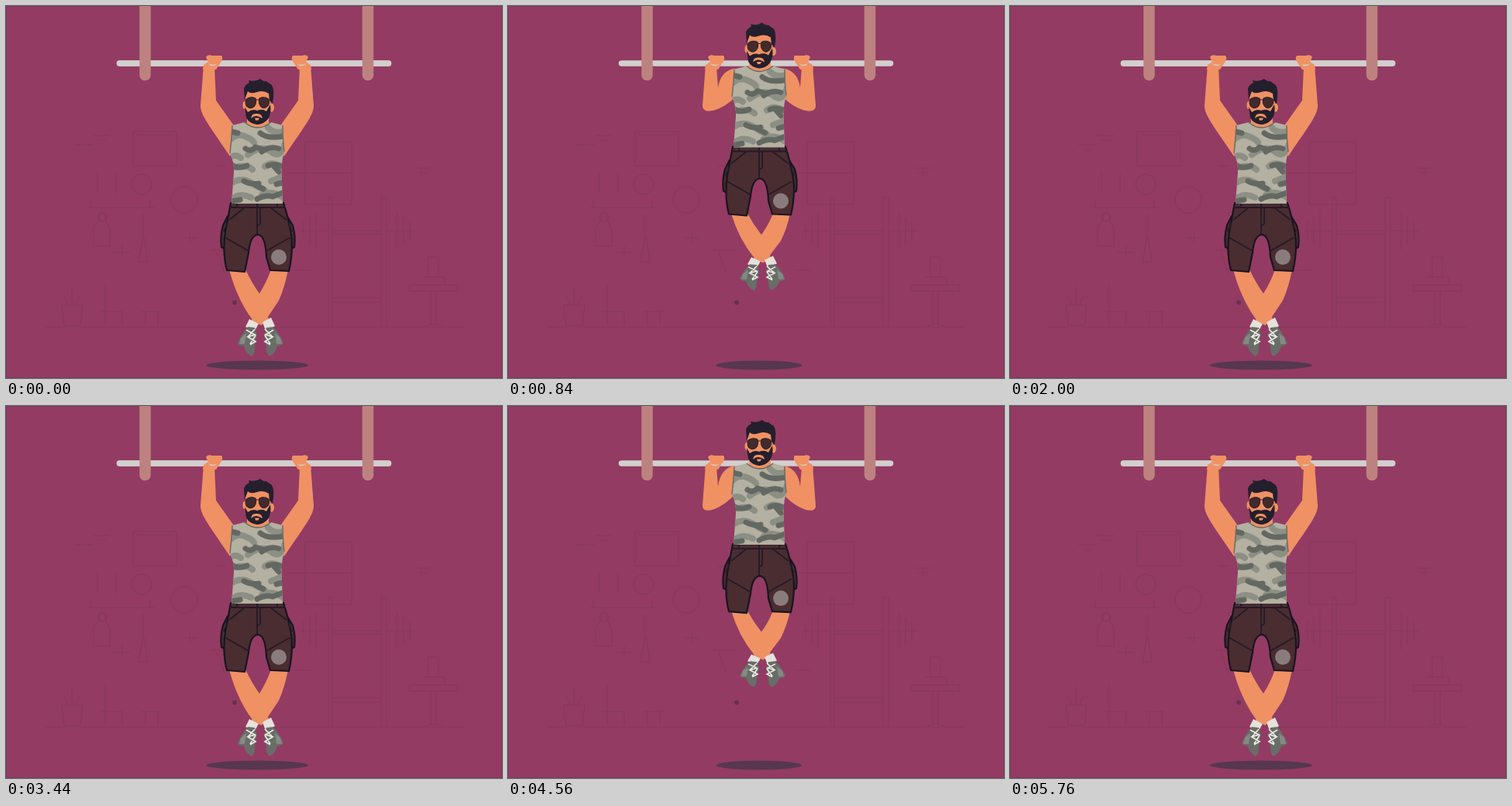
Write an HTML page that moves like this. It is 640 px wide and 480 px high and loops after 6 s.

```html
<!DOCTYPE html>
<html lang="en">
<head>
<meta charset="utf-8">
<title>Pull-ups</title>
<style>
  html, body { margin: 0; width: 100%; height: 100%; overflow: hidden; background: #933b63; }
  svg { display: block; width: 100vw; height: 100vh; }
  .room { fill: none; stroke: #85385d; stroke-width: 1; }
  .skin { fill: #f09163; }
  .bar { stroke: #d2cfcc; stroke-width: 7.5; stroke-linecap: round; }
  .post { stroke: #bd8280; stroke-width: 14.5; stroke-linecap: round; }
  .camo { fill: none; stroke-linecap: round; stroke-linejoin: round; }
  .seam { fill: none; stroke: #231a29; stroke-width: 1.8; }
  .cloth { fill: #4a2d30; stroke: #191420; stroke-width: 2.2; stroke-linejoin: round; }
  .dark { fill: #241f2d; }
</style>
</head>
<body>
<svg viewBox="0 0 640 480">
  <defs>
    <path id="shirt" d="M292 154L308 150Q324 164 342 150L357 154Q356 173 359 188Q354 205 356 226L357 255H291L294 215Q295 203 289 190Q292 172 292 154Z"/>
    <clipPath id="shirtClip"><use href="#shirt"/></clipPath>
    <path id="shoe" d="M312 414Q304 423 299 435Q300 438 307 439Q309 448 317 452Q321 450 321 440L324 424L321 415Z"/>
    <g id="hand">
      <path class="skin" d="M258 66Q260 62 266 64L278 64Q281 68 277 73L271 82H254L255 76L261 72Z"/>
      <path d="M261 74Q266 77 272 75L269 77Q264 78 261 74Z" fill="#d2cfcc"/>
    </g>
  </defs>

  <rect width="640" height="480" fill="#933b63" stroke="#84375a" stroke-width="2"/>
  <g class="room">
    <path d="M50 414H590M164 162H220V206H164ZM168 166H216M386 175H446V256H386ZM386 215H446M360 215H386"/>
    <path d="M112 167H134M118 173H130M88 179H112M96 185H106M526 209H547M530 215H542M536 209V219"/>
    <path d="M106 260H192M110 250V260M186 250V260M118 214V240M142 216V242"/>
    <path d="M416 414V247H421V414M484 414V247H491V414M421 290H484M421 294H484M421 376H484M421 382H484"/>
    <path d="M380 290H416M491 290H528M384 278V302M392 272V308M400 266V314M505 266V314M513 272V308M521 278V302"/>
    <path d="M72 386H99L96 412H75ZM80 386Q76 372 72 374M85 386V362M90 386Q95 368 99 376"/>
    <path d="M520 360H583V368H520ZM548 368V412M555 368V412M540 414Q552 406 564 414M545 324H558V350H545ZM538 350H566V360"/>
    <path d="M120 268V276L113 285V310H134V288L128 276V268ZM177 268V298L171 330H183L178 298M138 318H160M150 308V324M228 299H246M237 292V306"/>
    <path d="M128 360V412M122 394H150V412M175 394H200M180 394V412M196 394V412M265 315H296M272 318L282 345M370 341H392M270 206H282"/>
    <circle cx="175" cy="230" r="13"/><circle cx="230" cy="250" r="17"/><circle cx="124" cy="272" r="6"/>
  </g>
  <circle cx="295" cy="382.500" r="3" fill="#63344f"/>
  <ellipse id="shadow" cx="324" cy="463.500" ry="6" fill="#573750"/>

  <path class="bar" d="M146.500 74H493.500"/>
  <path id="armL" class="skin"/>
  <path id="armR" class="skin" transform="matrix(-1 0 0 1 648 0)"/>

  <g id="body">
    <g id="legs">
      <path class="skin" d="M288 340H309Q317 357 327 371Q335 386 339 405L329 412L318 405Q298 378 288 340Z"/>
      <path class="skin" d="M342 340H364Q360 362 352 380L332 410L317 408Q318 388 327 371Q336 357 342 340Z"/>
      <path d="M314 404L326 410L321 419L309 414ZM331 408L342 402L347 413L335 419Z" fill="#e5e1dc"/>
      <use href="#shoe" fill="#686d68"/>
      <use href="#shoe" fill="#686d68" transform="matrix(-1 0 0 1 657 0)"/>
      <path d="M303 428L310 422L308 436L301 436ZM354 428L347 422L349 436L356 436Z" fill="#858981"/>
      <path d="M310 418L321 424L312 427L322 433L315 437M321 417L312 427M322 425L315 436M345 418L335 424L344 427L334 433L341 437M334 417L344 427M334 425L341 436" fill="none" stroke="#eeeae4" stroke-width="1.700"/>
    </g>

    <path class="cloth" d="M286 271L280 283Q276 298 278 311L285 315ZM362 270L370 283Q374 298 372 311L366 315Z"/>
    <path class="cloth" d="M290 254H358Q364 272 368 295Q371 316 365 342L341 341L336 324Q335 296 325 295Q315 296 313 318L308 343L285 341Q279 318 283 291Z"/>
    <path class="seam" d="M289 260H360M324 255V294M328 260V281L324 284M308 260L288 276M341 260L362 276M283 299L313 316M366 299L336 316M286 279L281 291M364 279L369 291M298 255V260M350 255V260"/>
    <circle cx="352" cy="324" r="10" fill="#8a7c7c"/>

    <path class="skin" d="M311 136H339V150Q342 155 338 160H312Q305 154 311 150Z"/>
    <use href="#shirt" fill="#b4b0a2"/>
    <g class="camo" clip-path="url(#shirtClip)">
      <g stroke="#8c8f84" stroke-width="8">
        <path d="M290 172Q298 164 308 168T320 176M338 157Q346 166 360 161M312 192Q330 178 342 188T360 178"/>
        <path d="M288 196Q296 190 303 196M296 208Q310 204 318 211M334 207Q346 198 360 212"/>
        <path d="M292 228Q304 220 318 229T334 238M342 226L360 219M291 249Q303 240 316 247M330 244Q344 236 360 249"/>
      </g>
      <g stroke="#646862" stroke-width="7">
        <path d="M291 162L299 164M328 164Q338 172 358 168M309 184Q316 189 322 182L334 186M330 188Q340 180 352 184"/>
        <path d="M291 205Q300 211 311 206M338 206Q346 202 358 208M345 206L352 214"/>
        <path d="M307 226Q316 231 326 229M320 230L332 236M349 230L360 227"/>
        <path d="M324 249Q336 243 344 246L357 241M291 252L302 250"/>
      </g>
    </g>
    <path d="M308 150Q324 164 342 150M292 154Q291 173 289 190M357 154Q357 173 359 188" fill="none" stroke="#686c65" stroke-width="1.500"/>

    <ellipse class="skin" cx="308" cy="128" rx="2.500" ry="5"/>
    <ellipse class="skin" cx="342.500" cy="131" rx="3.500" ry="5.500"/>
    <path class="skin" d="M309 108Q324 102 342 109L341 135Q336 150 324 151Q312 148 309 135Z"/>
    <path class="dark" d="M308 121L307 106Q309 101 314 99L313 96Q322 98 328 94Q333 98 336 97Q338 99 343 102Q347 108 344 126L340 122L339 113Q332 108 324 111Q315 114 312 110Z"/>
    <path class="dark" d="M308 130L312 137Q318 132 324 135Q331 132 336 136L341 127Q343 138 338 146Q332 153 324 153Q314 152 310 144Z"/>
    <path class="skin" d="M316 145Q317 138 323 139Q330 138 331 145L327 143Q323 141 319 143ZM321 144.500H327L325.500 147.500H322Z"/>
    <path d="M310 120Q316 116 322 119Q324 126 320 130Q315 134 310 129Q308 125 310 120ZM327 119Q333 116 339 120Q341 125 338 129Q333 134 329 130Q325 126 327 119ZM322 121H327" fill="#432a2b" stroke="#2a2027"/>
  </g>

  <path id="frontBar" class="bar" d="M146.500 74H493.500"/>
  <use href="#hand"/>
  <use href="#hand" transform="matrix(-1 0 0 1 648 0)"/>
  <path class="post" d="M179.500 -10V89M467 -10V89"/>
</svg>
<script>
  const $ = id => document.getElementById(id);
  const LOOP = 6000, STEP = 40, STARTS = [0, 3520];
  const HEIGHT = 76, RISE = 1070, FALL = 910, HEM = 342;

  // Fast pull that slows at the top, then an eased way down.
  function lift(t) {
    if (t <= 0 || t >= RISE + FALL) return 0;
    if (t < RISE) return HEIGHT * (1 - (1 - t / RISE) ** 2);
    return HEIGHT * (1 + Math.cos(Math.PI * (t - RISE) / FALL)) / 2;
  }

  function armPath(up) {
    const under = 158 - 20 * (up / 72) ** 2;
    const bend = 122 - Math.max(0, up - 43) * 0.55;
    const shoulder = Math.min(126, 156 - up);
    return `M255 76L251 128C250 140 ${265 + up * 0.07} ${under} 289 ${194 - up}` +
      `L300 ${175 - up}L293 ${153 - up}Q274 ${shoulder} 271 ${bend}L269 78Z`;
  }

  function draw(now) {
    const t = Math.floor(now % LOOP / STEP) * STEP;
    const up = STARTS.reduce((sum, start) => sum + lift(t - start), 0);
    $('body').setAttribute('transform', `translate(0 ${-up})`);
    // The legs fold a little as the body rises.
    $('legs').setAttribute('transform', `translate(0 ${HEM}) scale(1 ${1 - up * 0.0016}) translate(0 ${-HEM})`);
    $('armL').setAttribute('d', armPath(up));
    $('armR').setAttribute('d', armPath(up));
    $('shadow').setAttribute('rx', 66 - up * 0.14);
    // The chin clears the bar near the top.
    $('frontBar').setAttribute('visibility', up > 64 ? 'hidden' : 'visible');
  }

  function tick() {
    draw(performance.now());
    requestAnimationFrame(tick);
  }
  tick();
</script>
</body>
</html>
```
